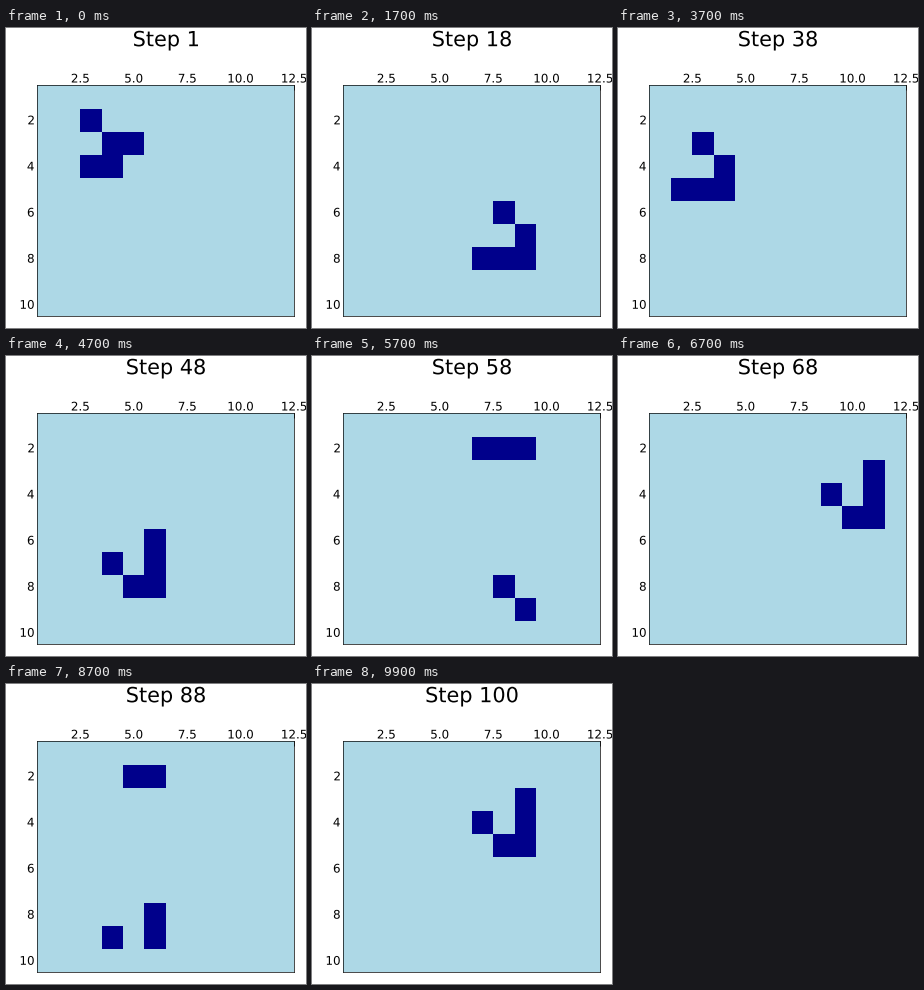
A matplotlib script that plays this animation: 300 px wide and 300 px high, repeating every 10000 ms.

```python
import numpy as np
import matplotlib.pyplot as plt
from matplotlib.animation import FuncAnimation
from matplotlib.colors import ListedColormap
from matplotlib.patches import PathPatch
from matplotlib.textpath import TextPath
from matplotlib.transforms import Affine2D

SIZE, DPI = 300, 100
STEPS, INTERVAL = 100, 100
ROWS, COLS = 8, 10          # live torus, shown inside a one-cell dead border
LEFT, RIGHT, TOP, BOTTOM = 31.45, 288.25, 57.47, 287.95
CELL_W = (RIGHT - LEFT) / (COLS + 2)
CELL_H = (BOTTOM - TOP) / (ROWS + 2)
TITLE_PX, LABEL_PX = 20.83, 11.9
CAP = 0.729                 # digit height in em

plt.rcParams["font.family"] = "DejaVu Sans"


def evolve(grid):
    """One Game of Life generation on a torus."""
    near = sum(np.roll(grid, (dy, dx), (0, 1))
               for dy in (-1, 0, 1) for dx in (-1, 0, 1) if dy or dx)
    return ((near == 3) | ((grid == 1) & (near == 2))).astype(int)


def history():
    grid = np.zeros((ROWS, COLS), int)
    grid[0:3, 1:4] = [[1, 0, 0], [0, 1, 1], [1, 1, 0]]
    boards = []
    for _ in range(STEPS):
        boards.append(np.pad(grid, 1))
        grid = evolve(grid)
    return boards


def outline(text, x, baseline, size, anchor=0.5):
    """Unhinted glyphs; anchor is the fraction of the ink width put at x."""
    path = TextPath((0, 0), text, size=size)
    box = path.get_extents()
    shift = x - box.x0 - anchor * box.width
    return Affine2D().translate(shift, SIZE - baseline).transform_path(path)


def title_path(step):
    return outline(f"Step {step}", 160, 18.2, TITLE_PX)


def add_text(path):
    return stage.add_patch(PathPatch(path, fc="black", lw=0, snap=False))


boards = history()
xticks = np.arange(2.5, 13, 2.5)
yticks = np.arange(2, 11, 2)

fig = plt.figure(figsize=(SIZE / DPI, SIZE / DPI), dpi=DPI, facecolor="white")
ax = fig.add_axes([LEFT / SIZE, 1 - BOTTOM / SIZE,
                   (RIGHT - LEFT) / SIZE, (BOTTOM - TOP) / SIZE])
mesh = ax.pcolormesh(np.arange(COLS + 3) + 0.5, np.arange(ROWS + 3) + 0.5,
                     boards[0], cmap=ListedColormap(["lightblue", "darkblue"]),
                     vmin=0, vmax=1, antialiased=False)
ax.set_axisbelow(True)
ax.xaxis.tick_top()
ax.set_xticks(xticks)
ax.set_yticks(yticks)
ax.set_xlim(0.5, COLS + 2.5)
ax.set_ylim(ROWS + 2.5, 0.5)
ax.tick_params(direction="in", length=3.5, width=0.5,
               labeltop=False, labelleft=False)
for spine in ax.spines.values():
    spine.set_linewidth(0.5)

# Lettering lives on an overlay measured in pixels.
stage = fig.add_axes([0, 0, 1, 1], xlim=(0, SIZE), ylim=(0, SIZE))
stage.axis("off")
for v in xticks:
    add_text(outline(f"{v:.1f}", LEFT + (v - 0.5) * CELL_W, 54.5, LABEL_PX))
for v in yticks:
    middle = TOP + (v - 0.5) * CELL_H
    add_text(outline(str(v), 27.8, middle + CAP * LABEL_PX / 2, LABEL_PX, 1))
title = add_text(title_path(1))


def draw(i):
    mesh.set_array(boards[i])
    title.set_path(title_path(i + 1))
    return mesh, title


anim = FuncAnimation(fig, draw, frames=STEPS, interval=INTERVAL,
                     init_func=lambda: draw(0), repeat=True, repeat_delay=0)
plt.show()
```
